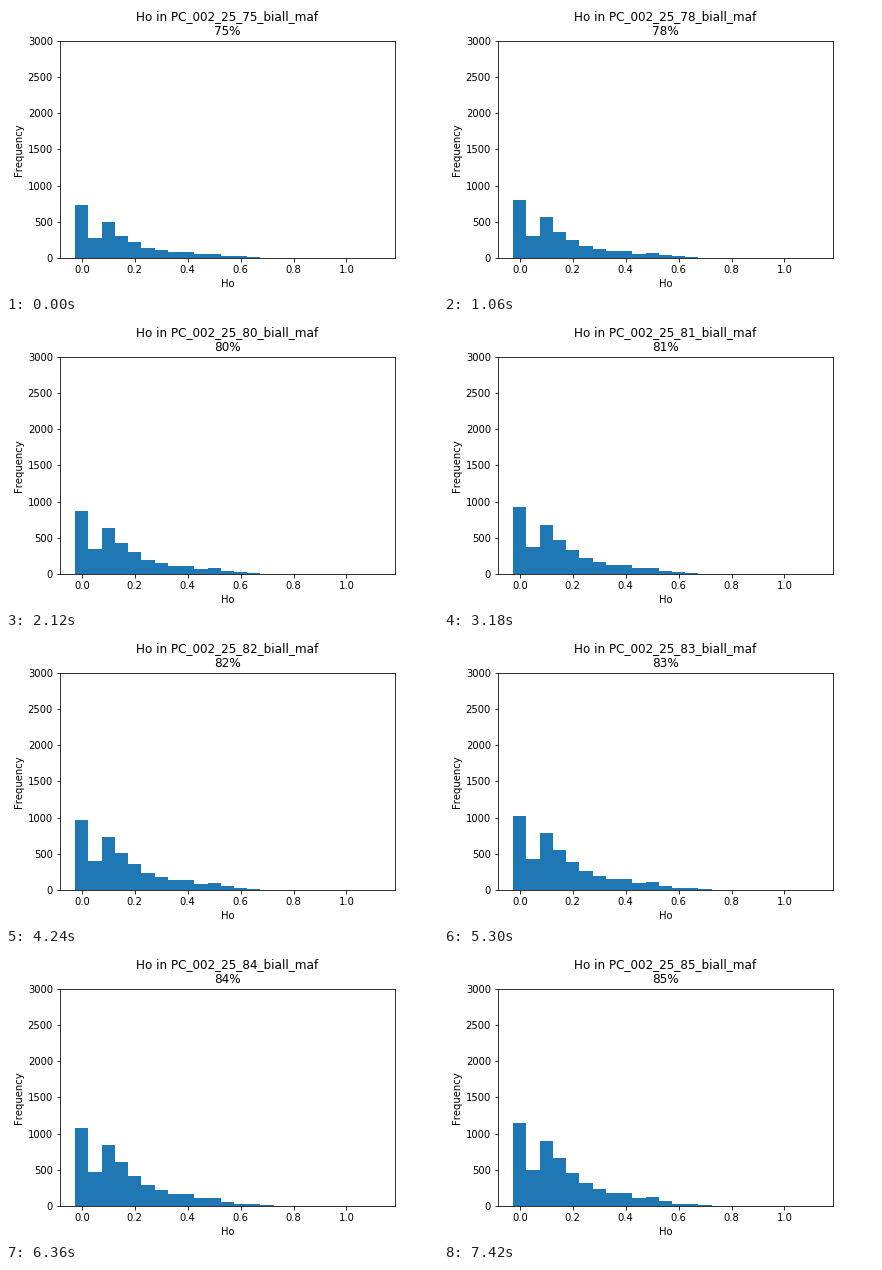
These frames come from a looping animation (432x288 px, 8 s). A matplotlib script:

```python
import numpy as np
import matplotlib.pyplot as plt
from matplotlib.animation import FuncAnimation

plt.rcParams["font.family"] = "DejaVu Sans"
plt.rcParams["text.kerning_factor"] = 6

STEP = 20       # ms per frame
HOLD = 1060     # ms per histogram
LOOP = 8000
BIN = 0.05
N_BINS = 23
LEVELS = [75, 78, *range(80, 86)]

# Histogram shape at the lowest and highest percentage.
LOW = [731, 276, 497, 304, 218, 136, 108, 83, 83, 51, 59, 33, 27, 14, 0]
HIGH = [1145, 497, 897, 662, 453, 314, 233, 179, 179, 115, 122, 63, 27, 24, 11]


def pad(counts):
    return np.pad(np.array(counts, float), (0, N_BINS - len(counts)))


def heights(level):
    """Counts grow from LOW to HIGH, faster towards the end."""
    p = (level - LEVELS[0]) / (LEVELS[-1] - LEVELS[0])
    low, high = pad(LOW), pad(HIGH)
    return low + (high - low) * p ** 1.55


fig, ax = plt.subplots(figsize=(6, 4), dpi=72)
fig.subplots_adjust(left=0.125, right=0.9, bottom=0.125, top=0.88)

lefts = -BIN / 2 + BIN * np.arange(N_BINS)
bars = ax.bar(lefts, np.zeros(N_BINS), width=BIN, align="edge", color="#1f77b4")

margin = 0.05 * BIN * N_BINS
ax.set_xlim(lefts[0] - margin, lefts[-1] + BIN + margin)
ax.set_ylim(0, 3000)
ax.set_xticks(np.arange(0, 1.1, 0.2))
ax.set_xlabel("Ho")
ax.set_ylabel("Frequency")
title = ax.set_title("")


def update(i):
    level = LEVELS[i * STEP // HOLD]
    for bar, height in zip(bars, heights(level)):
        bar.set_height(height)
        bar.set_visible(height > 0)
    title.set_text(f"Ho in PC_002_25_{level}_biall_maf\n{level}%")
    return [*bars, title]


anim = FuncAnimation(fig, update, frames=LOOP // STEP, interval=STEP,
                     repeat=True, repeat_delay=0, blit=False)
plt.show()
```
